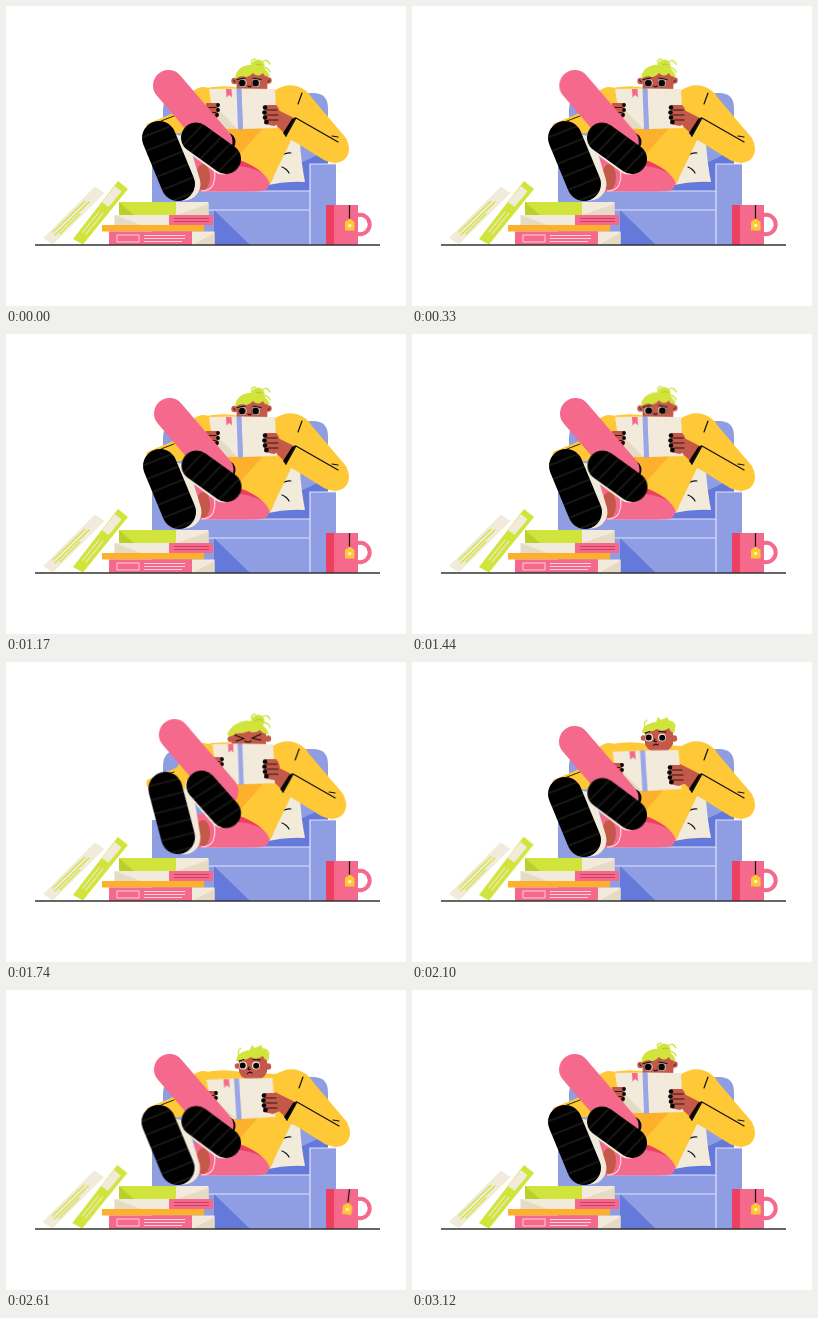
Recreate the animation shown at these times as an HTML page without scripts. Size 400 by 300 pixels, loop 3.15 s.

```html
<!DOCTYPE html>
<html lang="en">
<head>
<meta charset="utf-8">
<title>Reading on the sofa</title>
<style>
html, body { margin: 0; width: 100%; height: 100%; overflow: hidden; background: #fff; }
svg { display: block; width: 100vw; height: 100vh; }
.blue { fill: #8f9ee3 } .navy { fill: #6479da } .cream { fill: #f2ebdc } .tan { fill: #e5dac4 }
.yel { fill: #ffc837 } .amber { fill: #fdb02c } .pink { fill: #f5698c } .red { fill: #ec3f62 }
.skin { fill: #c4594a } .lime { fill: #d0e43b } .olive { fill: #bad12d } .ink { fill: #050505 }
.ln { fill: none; stroke: #111; stroke-width: 1.2; stroke-linecap: round; stroke-linejoin: round }
.thin { stroke-width: .9 }
.wh { fill: none; stroke: #dfe3fb; stroke-width: 1.2 }
.cap { fill: none; stroke-linecap: round }

/* one loop for every moving part */
.mv { animation: 3150ms linear infinite }
.sole1 { animation-name: sole1; transform-origin: 172px 178px }
.sole2 { animation-name: sole2; transform-origin: 220px 153px }
.leg { animation-name: leg }
.book { animation-name: book; transform-origin: 271px 103px }
.lhand { animation-name: lhand }
.rhand { animation-name: rhand }
.arm { animation-name: arm }
.headA { animation-name: nod }
.headB { animation-name: laugh }
.look { animation-name: look; animation-timing-function: ease-in-out }
.bun { animation-name: bun; transform-origin: 250px 66px }
.tuft { animation-name: tuft; transform-origin: 247px 68px }
.tag { animation-name: tag; transform-origin: 343px 199px }
.lean { animation-name: lean; transform-origin: 62px 239px }
.a { animation: showA 3150ms step-end infinite }
.b { animation: showB 3150ms step-end infinite }
.c { animation: showC 3150ms step-end infinite }

@keyframes showA { 0%, 93.5% { visibility: visible } 53%, 100% { visibility: hidden } }
@keyframes showB { 0%, 65.3%, 100% { visibility: hidden } 53% { visibility: visible } }
@keyframes showC { 0%, 93.5%, 100% { visibility: hidden } 65.3% { visibility: visible } }
@keyframes sole1 {
  0%, 21%, 66.7%, 100% { transform: none }
  37%, 51.5% { transform: translate(1px, 0) }
  55%, 59%, 63% { transform: translate(0, -3px) rotate(8deg) }
  57%, 61% { transform: translate(0, -2px) rotate(6.5deg) }
  83%, 92% { transform: translate(-.5px, 0) }
}
@keyframes sole2 {
  0%, 21%, 100% { transform: none } 37%, 51.5% { transform: translate(.5px, 0) }
  55%, 59%, 63% { transform: translate(0, -2px) rotate(13deg) }
  57%, 61% { transform: translate(0, -1px) rotate(11deg) }
  66.7%, 92% { transform: rotate(1deg) }
}
@keyframes leg {
  0%, 66.7%, 100% { transform: none } 37%, 51.5%, 83%, 92% { transform: translate(1px, 0) }
  55%, 59%, 63% { transform: translate(6px, -7px) }
  57%, 61% { transform: translate(5px, -6px) }
}
@keyframes book {
  0%, 51.5%, 96%, 100% { transform: none }
  55%, 59%, 63% { transform: translate(-2px, -1px) scaleX(.92) }
  57%, 61% { transform: translate(-2px, 0) scaleX(.93) }
  66.7%, 92% { transform: translate(-2px, 5px) rotate(-1.5deg) }
}
@keyframes lhand {
  0%, 51.5%, 96%, 100% { transform: none }
  55%, 59%, 63% { transform: translate(4px, -2px) } 57%, 61% { transform: translate(4px, -1px) }
  66.7%, 92% { transform: translate(-2px, 4px) }
}
@keyframes rhand {
  0%, 51.5%, 96%, 100% { transform: none }
  55%, 59%, 63% { transform: translate(0, -2px) } 57%, 61% { transform: translate(0, -1px) }
  66.7%, 92% { transform: translate(-1px, 4px) }
}
@keyframes arm {
  0%, 51.5%, 66.7%, 96%, 100% { transform: none }
  55%, 59%, 63% { transform: translate(-3px, 0) } 57%, 61% { transform: translate(-2px, 0) }
  83%, 92% { transform: translate(1px, 0) }
}
@keyframes nod {
  0%, 21%, 37%, 100% { transform: none } 29%, 45% { transform: translate(0, -.5px) }
  53% { transform: translate(-1px, -1px) }
}
@keyframes laugh {
  0%, 55%, 59%, 63%, 100% { transform: none } 53%, 57%, 61% { transform: translate(0, 1px) }
}
@keyframes look {
  0%, 8% { transform: translate(-.4px, 0) } 18%, 25% { transform: translate(1px, .5px) }
  31%, 40% { transform: translate(-.4px, 0) } 50%, 92% { transform: translate(.8px, .3px) }
  100% { transform: translate(-.4px, 0) }
}
@keyframes bun {
  0%, 21%, 37%, 100% { transform: none } 10%, 45% { transform: rotate(2deg) } 29% { transform: rotate(-2deg) }
}
@keyframes tuft {
  0%, 66.7% { transform: none } 74% { transform: rotate(2deg) } 83%, 100% { transform: rotate(-1deg) }
}
@keyframes tag {
  0%, 66.7%, 100% { transform: none } 72% { transform: rotate(-7deg) }
  83% { transform: rotate(7deg) } 92% { transform: rotate(-3deg) }
}
@keyframes lean {
  0%, 52%, 100% { transform: none } 64%, 67% { transform: rotate(-.4deg) }
  75% { transform: rotate(.5deg) } 83% { transform: translate(-.7px, 0) }
}
</style>
</head>
<body>
<svg viewBox="0 0 400 300">
<defs>
  <pattern id="tread" width="40" height="14" patternUnits="userSpaceOnUse" patternTransform="rotate(-22)">
    <path d="M0 0H40V14H0Z"/><path d="M0 5H40" stroke="#484846" stroke-width=".6"/>
  </pattern>
  <pattern id="tread2" width="40" height="11" patternUnits="userSpaceOnUse" patternTransform="rotate(-46)">
    <path d="M0 0H40V11H0Z"/><path d="M0 4H40" stroke="#484846" stroke-width=".6"/>
  </pattern>
  <g id="bun">
    <circle class="lime" cx="252" cy="60" r="6.500"/>
    <path class="cap" stroke="#d0e43b" stroke-width="1.400" d="M247 59Q243 54 249 53M256 56Q261 52 264 58M257 61Q263 62 264 66"/>
    <path class="cap" stroke="#a9bf22" stroke-width=".8" d="M248 61Q252 56 256 59"/>
  </g>
</defs>

<!-- sofa -->
<path class="blue" d="M157 185V104Q157 88 173 88H196L262 87H307Q322 87 322 102V185Z"/>
<path class="navy" d="M288 185V160L322 144V185Z"/>
<path class="blue" d="M146 158H200V185H304V239H146Z"/>
<path class="navy" d="M262 178L304 174V185H205Z"/>
<path class="navy" d="M208 204L244 239H208Z"/>
<path class="wh" d="M196 185H304M203 204H304"/>
<path class="blue" d="M304 158H330V239H304Z"/>
<path class="wh" d="M304 239V158H330"/>

<!-- pillow -->
<path class="cream" d="M268 130L294 136Q295 155 299 176Q280 175 262 179Z"/>
<path class="ln" d="M275 150Q280 146 285 147M276 161Q281 163 283 167"/>

<!-- far arm and body -->
<path class="yel" d="M205 83Q195 78 186 86L170 106L141 118Q138 127 150 130L200 124L212 100Z"/>
<path class="ln thin" d="M155 115L168 110"/>
<path class="pink" d="M188 152H240L262 160L267 172L261 183Q258 185.500 246 185.500H190Z"/>
<path class="red" d="M216 148L254 155L259 168Q240 158 222 160Z"/>
<path class="yel" d="M196 83Q215 78 235 82L270 84Q285 76 299 87L288 128L264 178Q259 163 231 153L205 120Z"/>
<path class="amber" d="M222 122H257L234 148L222 140Z"/>
<path class="wh" style="stroke:#fbd3dc" d="M204 153Q212 167 207 179Q204 185 195 185"/>

<!-- heads -->
<g class="a"><g class="headA mv">
  <circle class="skin" cx="228.500" cy="75" r="3.200"/><circle class="skin" cx="262.500" cy="74.500" r="3.200"/>
  <path class="skin" d="M230 68Q246 60 262 68L261 88H231Z"/>
  <use href="#bun" class="bun mv"/>
  <path class="lime" d="M229 73Q230 61 242 59Q258 57 264 70Q259 72 257 67Q252 72 247 67Q241 73 237 70Q234 70 229 73Z"/>
  <g fill="#f7efe6"><circle cx="236.500" cy="77" r="4"/><circle cx="250" cy="77" r="4"/></g>
  <g class="ink look mv"><circle cx="236.500" cy="77" r="3.500"/><circle cx="250" cy="77" r="3.500"/></g>
  <path class="ln" d="M231 73.500L239 72M247 72L255 73.500M242 80Q243.500 82 245 80"/>
  <path class="ln thin" d="M227.500 74L229 76M262 76L263.500 74"/>
</g></g>

<g class="b"><g class="headB mv">
  <circle class="skin" cx="224.500" cy="77" r="3"/><circle class="skin" cx="262" cy="76.500" r="3.200"/>
  <path class="skin" d="M225 72Q243 60 260 70V89H226Z"/>
  <use href="#bun" y="-1"/>
  <path class="lime" d="M221 72Q227 60 240 58.500Q258 58 263 72Q257 72 254 68Q248 72 243 69Q234 72 230 71Q226 75 223 74Z"/>
  <path class="ln" d="M229 73L238 76.500L230 79M255 72L246 76L255 78M239 79Q242 81 245 79"/>
</g></g>

<g class="c">
  <circle class="skin" cx="231.500" cy="76" r="2.800"/><circle class="skin" cx="262" cy="76.500" r="3.200"/>
  <path class="skin" d="M233 68Q247 62 261 67V82Q257 91 247 91Q236 90 233 82Z"/>
  <g class="tuft mv">
    <path class="lime" d="M230 71Q230 62 244 60L246 55L249 58L256 55Q255 58 260 60Q265 65 262 71Q258 70 257 66Q250 71 245 67Q238 71 230 71Z"/>
    <path class="cap" stroke="#d0e43b" stroke-width="1.200" d="M234 67Q230 62 235 58M258 59Q263 60 263 65"/>
  </g>
  <g fill="#f7efe6"><circle cx="237" cy="75.500" r="3.900"/><circle cx="250" cy="75.500" r="3.900"/></g>
  <g class="ink"><circle cx="236.700" cy="75.500" r="3"/><circle cx="250.200" cy="75.800" r="3"/></g>
  <path class="ln" d="M233 71L238 69.500M247 69.500L254 70M243 77L242 79.500H244.500M241.500 83.500Q243.500 81 246 83"/>
</g>

<!-- near arm -->
<g class="arm mv">
  <path class="yel" d="M268 85Q284 74 299 84Q303 87 306 92L340 132Q347 146 338 154Q330 160 318 154L281 131L270 108Z"/>
  <path class="skin" d="M268 102L290 113L281 130L270 119Z"/>
  <path class="ink" d="M290 111L286 113L277 127L280 131Z"/>
  <path class="yel" d="M290 112L300 117L289 136L280 130Z"/>
  <path class="ln" d="M296 87L292 98M280 130L290 112L332 136M326 130L332 131"/>
</g>

<!-- open book -->
<g class="book mv">
  <path class="cream" d="M203 83L231 82.500L236 123L209 122Z"/>
  <path class="tan" d="M205 96L231 122.500L209 122Z"/>
  <path class="cream" d="M235 82.500L269 83L271 122L237 123Z"/>
  <path d="M230.500 82.500H235.500L237 123.500H232Z" fill="#99a6e8"/>
  <path class="pink" d="M220 83H225.500L226 91.500L223.300 89L220.500 91.500Z"/>
</g>
<g class="lhand mv">
  <path class="skin" d="M200 97H212Q215 99 212 102Q215 104 212 106Q214 109 211 112L200 114Z"/>
  <g class="ink"><circle cx="212" cy="99" r="1.900"/><circle cx="212" cy="104" r="1.900"/><circle cx="211" cy="109" r="1.900"/></g>
  <path class="ln thin" d="M203 101.500H210M203 106.500H210"/>
</g>
<g class="rhand mv">
  <path class="skin" d="M259 99H270Q274 102 274 110L275 117L268 120L258 118Z"/>
  <g class="ink"><circle cx="259" cy="101.500" r="2.300"/><circle cx="258.500" cy="106.500" r="2.300"/><circle cx="259" cy="111.500" r="2.300"/><circle cx="260.500" cy="116" r="2.300"/></g>
  <path class="ln thin" d="M261 104H271M261 109H272M262 114H272"/>
</g>

<!-- legs -->
<ellipse class="skin" cx="197" cy="171" rx="7" ry="13"/>
<ellipse class="ink" cx="222" cy="136" rx="7.500" ry="9"/>
<ellipse class="skin" cx="220" cy="137" rx="5.500" ry="8"/>
<path class="leg mv cap" d="M162.500 79.500L211 136" stroke="#f5698c" stroke-width="31"/>
<g class="sole1 mv">
  <path class="cap" d="M168 145L178 178" stroke="#f2ebdc" stroke-width="33"/>
  <path class="cap" d="M153 132L172 178" stroke="url(#tread)" stroke-width="34"/>
</g>
<g class="sole2 mv">
  <path class="cap" d="M188.500 133L217 154" stroke="#f2ebdc" stroke-width="29"/>
  <path class="cap" d="M190 131.500L220 153" stroke="url(#tread2)" stroke-width="30"/>
</g>

<!-- leaning books -->
<g class="lean mv">
  <path class="cream" d="M37 232L89 180.500L98.500 187L47 238.500Z"/>
  <path class="cap" stroke="#d0e43b" stroke-width="1.200" d="M47 226L79 195M49 229L83 196M54 228L74 208"/>
  <path class="lime" d="M67 233L112 175L122 183L77 238.500Z"/>
  <path class="cream" d="M96 196L109 180L115.500 185.500L102.500 201Z"/>
  <path class="cap" stroke="#f2ebdc" stroke-width="1.100" d="M77 226L93 206M80 228L97 207"/>
</g>

<!-- stacked books -->
<path class="lime" d="M113 196H170V209H113Z"/><path class="olive" d="M113 196L128 209H113Z"/>
<path class="cream" d="M170 196H202.500V209H170Z"/><path class="tan" d="M170 209L202.500 198V209Z"/>
<path class="tan" d="M108.500 209H163V219H108.500Z"/><path class="cream" d="M108.500 209H163V219H135Z"/>
<path class="pink" d="M163 209H207V219H163Z"/>
<path stroke="#c8385c" stroke-width=".9" d="M168 212.500H203M168 215.500H203"/>
<path class="amber" d="M96 219H198V225.500H96Z"/>
<path class="pink" d="M103 225.500H187V239H103Z"/>
<path class="cream" d="M186 225.500H208.500V239H186Z"/><path class="tan" d="M186 239L208.500 227V239Z"/>
<path fill="none" stroke="#fbd3dc" d="M111 229H133V236H111ZM138 229.500H179M138 232.500H179M138 235.500H176"/>

<!-- mug -->
<circle cx="354" cy="218.500" r="9.700" fill="none" stroke="#f5698c" stroke-width="4"/>
<path class="pink" d="M320 199H352V239H320Z"/><path class="red" d="M320 199H328V239H320Z"/>
<g class="tag mv">
  <path class="ln" d="M343.500 199.500V214"/>
  <path class="yel" d="M339 216L343.500 212.500L348.500 216V224.500H339Z"/>
  <circle cx="343.700" cy="219.500" r="1.700" fill="#fff0c2"/>
</g>

<path d="M29 239H374" stroke="#333" stroke-width="1.300"/>
</svg>
</body>
</html>
```
